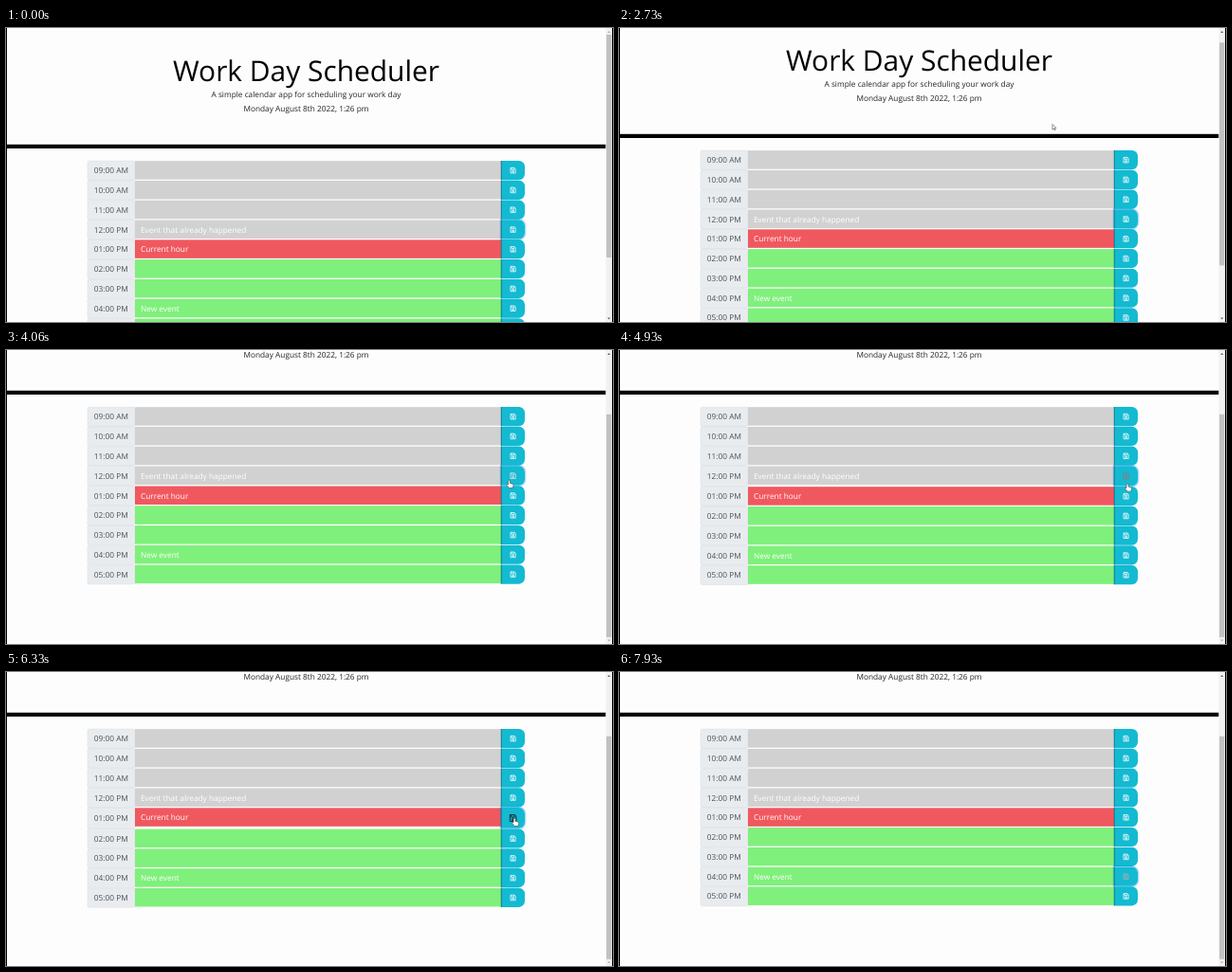
Write an HTML page that moves like this. It is 640x310 px and loops after 8000 ms.

```html
<!DOCTYPE html>
<html lang="en">
<head>
<meta charset="utf-8">
<title>Work Day Scheduler</title>
<style>
html, body { margin: 0; height: 100%; overflow: hidden; background: #fdfdfd; }
svg { display: block; width: 640px; height: 310px; }
text { font: 8.306px "Open Sans", sans-serif; fill: #212529; text-rendering: geometricPrecision; }
.mid { text-anchor: middle; }
.title { font-size: 29.9px; fill: #000; }
.hour { fill: #495057; }
.note { fill: #fff; }
</style>
</head>
<body>
<svg id="stage" viewBox="0 0 640 310"></svg>
<script>
const PITCH = 20.78, TOP = 140, LOOP = 8000, MAX_SCROLL = 80;
const notes = { 3: 'Event that already happened', 4: 'Current hour', 7: 'New event' };

// Button hovers: row, time in, time out, extra row height
const hovers = [
  [3, 3980, 4870, 1.5], [4, 5250, 6350, 1.5], [5, 6480, 6840, 0],
  [6, 6880, 7390, 0], [7, 7410, 7840, 0]
];

// Pointer stops: time, x, y
const stops = [
  [1000, 470, 304], [1260, 470, 290], [2060, 457, 101.5], [3330, 457, 101.5],
  [4130, 536, 140], [4730, 536, 139], [5530, 536, 150.5], [6200, 536, 150.5],
  [6860, 537, 185], [7060, 537, 192], [7600, 536, 212]
];

const glyphs = {
  arrow: 'M0 0V5.6L1.3 4.4 2.2 6.3 3.1 5.9 2.3 4.1H4Z',
  beam: 'M-1 -3H1M0 -3V3M-1 3H1',
  hand: 'M-1 .6Q0 -.6 1 .6V3.2L3.8 4Q4.8 4.3 4.6 5.5L3.8 8.3H0L-2.5 5.2Q-2.6 4 -1 4.7Z'
};

const stage = document.getElementById('stage');

function set(node, attrs) {
  for (const k in attrs) node.setAttribute(k, attrs[k]);
}
function add(parent, tag, attrs, content) {
  const node = document.createElementNS('http://www.w3.org/2000/svg', tag);
  set(node, attrs);
  if (content) node.textContent = content;
  return parent.appendChild(node);
}
const rect = (parent, x, y, width, height, fill) => add(parent, 'rect', { x, y, width, height, fill });
const clamp = v => Math.min(1, Math.max(0, v));
const smooth = u => u * u * (3 - 2 * u);
const mix = (a, b, u) => a + (b - a) * u;

// Button outline, round on the right, optionally grown by a margin
function buttonPath(h, m = 0) {
  const r = 6.2 + m, b = h + m;
  return `M${522 - m} ${-m}H${547 + m - r}a${r} ${r} 0 0 1 ${r} ${r}V${b - r}a${r} ${r} 0 0 1 ${-r} ${r}H${522 - m}Z`;
}

const page = add(stage, 'g', {});
add(page, 'text', { x: 316.5, y: 55.8, class: 'mid title' }, 'Work Day Scheduler');
add(page, 'text', { x: 316.5, y: 73, class: 'mid' }, 'A simple calendar app for scheduling your work day');
add(page, 'text', { x: 316.5, y: 88, class: 'mid' }, 'Monday August 8th 2022, 1:26 pm');
rect(page, 0, 122.8, 632.5, 4.2, '#000');

const rows = Array.from({ length: 9 }, (_, i) => {
  const g = add(page, 'g', {});
  const hour = 9 + i;
  const name = String((hour - 1) % 12 + 1).padStart(2, '0') + (hour < 12 ? ':00 AM' : ':00 PM');
  const label = add(g, 'rect', { x: 86, y: .2, width: 50, rx: 1.6, fill: '#e9ecef', stroke: '#ced4da', 'stroke-width': .4 });
  const labelText = add(g, 'text', { x: 92.8, class: 'hour' }, name);
  rect(g, 136, .2, 386, 19.5, i < 4 ? '#d1d1d1' : i > 4 ? '#7ff07b' : '#f0585f');
  add(g, 'text', { x: 142, y: 13.2, class: 'note' }, notes[i]);
  const ring = add(g, 'path', { fill: 'none', stroke: '#007bff', 'stroke-opacity': .3, 'stroke-width': 1.3 });
  const button = add(g, 'path', { fill: '#13bad2' });
  const edge = rect(g, 521.8, 0, .6, 20, '#0b4c58');
  const icon = add(g, 'path', {
    d: 'M-2.6 -2.8H1.5L2.6 -1.7V2.8H-2.6ZM-1.5 -2.6V-.8H1.2V-2.6M-.8 .5H.8V2H-.8Z',
    fill: 'none', 'stroke-width': .75
  });
  return { g, label, labelText, ring, button, edge, icon };
});

rect(stage, 632.5, 0, 6.5, 310, '#f1f1f1');
const thumb = rect(stage, 633, 7, 5.2, 235, '#c1c1c1');
const up = add(stage, 'path', { d: 'M634.2 5L635.7 3.2 637.2 5Z' });
const down = add(stage, 'path', { d: 'M634.2 305.5L635.7 307.3 637.2 305.5Z' });
rect(stage, 0, 0, 1, 310, '#000');
rect(stage, 639, 0, 1, 310, '#000');
const pointer = add(stage, 'path', { fill: '#fff', stroke: '#444', 'stroke-width': .6, 'stroke-linejoin': 'round' });

function scrollAt(t) {
  const u = clamp((t - 2600) / 410);
  return MAX_SCROLL * (u < .5 ? 4 * u ** 3 : 1 - 4 * (1 - u) ** 3);
}

function pointerAt(t) {
  const n = stops.findIndex(s => s[0] > t);
  if (n < 1) return stops[n ? stops.length - 1 : 0].slice(1);
  const a = stops[n - 1], b = stops[n];
  const u = smooth((t - a[0]) / (b[0] - a[0]));
  return [mix(a[1], b[1], u), mix(a[2], b[2], u)];
}

function drawRows(t) {
  const focus = t < 5670 ? 3 : t < 7600 ? 4 : 7;
  let y = TOP;
  rows.forEach((row, i) => {
    const hover = hovers.find(h => h[0] === i);
    const dark = hover ? clamp((t - hover[1]) / 150) - clamp((t - hover[2]) / 150) : 0;
    const grow = hover ? hover[3] * dark : 0;
    const h = 20.2 + grow;
    set(row.g, { transform: `translate(0 ${y})` });
    set(row.label, { height: h });
    set(row.labelText, { y: 13.2 + grow / 2 });
    set(row.button, { d: buttonPath(h) });
    set(row.ring, { d: buttonPath(h, .6), visibility: i === focus ? 'visible' : 'hidden' });
    set(row.edge, { height: h });
    set(row.icon, {
      transform: `translate(534.6 ${10.2 + grow / 2}) scale(${1 + grow / 6})`,
      stroke: `rgb(${mix(255, 33, dark)},${mix(255, 37, dark)},${mix(255, 41, dark)})`
    });
    y += PITCH + grow;
  });
}

function drawPointer(t, scroll) {
  const [x, y] = pointerAt(t);
  const py = y + scroll;
  const inRows = py > TOP && py < TOP + 9 * PITCH && x > 86 && x < 547;
  const kind = !inRows ? 'arrow' : x > 522 ? 'hand' : 'beam';
  set(pointer, {
    d: glyphs[kind],
    transform: `translate(${x} ${y})`,
    visibility: t >= 1000 && t < 7930 ? 'visible' : 'hidden'
  });
}

function draw(now) {
  const t = Math.floor((now % LOOP + 4) * .015) / .015;
  const scroll = scrollAt(t);
  set(page, { transform: `translate(0 ${-scroll})` });
  set(thumb, { y: 7 + scroll * .76 });
  set(up, { fill: scroll > 0 ? '#505050' : '#a3a3a3' });
  set(down, { fill: scroll < MAX_SCROLL ? '#505050' : '#a3a3a3' });
  drawRows(t);
  drawPointer(t, scroll);
}

let start;
function tick(now) {
  start ??= now;
  draw(now - start);
  requestAnimationFrame(tick);
}
draw(0);
requestAnimationFrame(tick);
</script>
</body>
</html>
```
